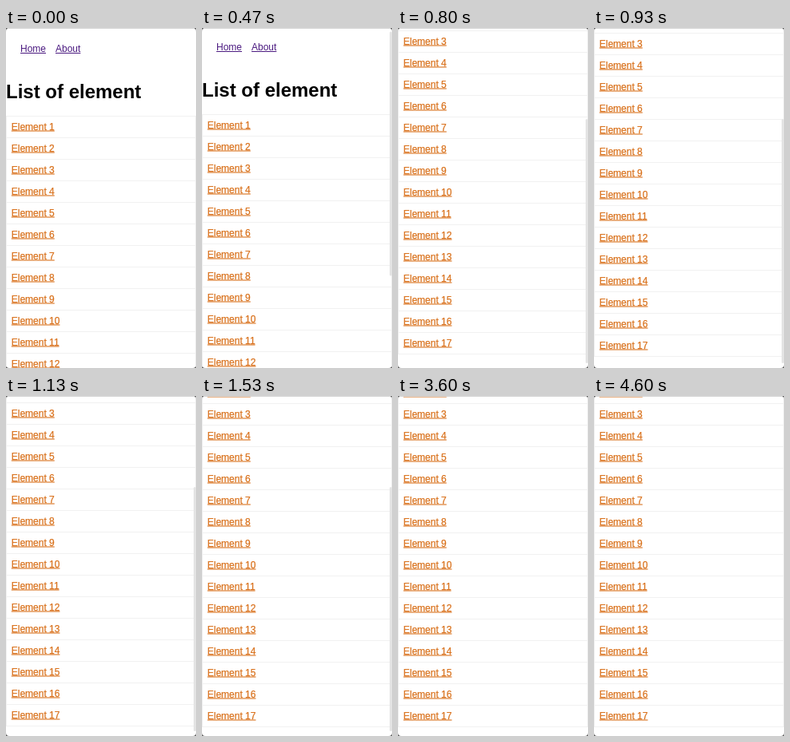
Animation, 238 px wide and 426 px high, one loop 4.67 s. Source, as an HTML page:

```html
<!DOCTYPE html>
<html lang="en">
<head>
<meta charset="utf-8">
<style>
  html, body { margin: 0; width: 100%; height: 100%; overflow: hidden; background: #555; }
  #stage {
    position: relative; width: 238px; height: 426px; overflow: hidden;
    background: #fff; border-radius: 4px;
    font: 12px/14px "Liberation Sans", Arial, sans-serif; color: #000;
  }
  #stage::after {
    content: ""; position: absolute; inset: 0;
    border-radius: 4px; box-shadow: inset 0 1px #d6d6d6;
  }
  #list { position: absolute; top: 0; left: 0; width: 238px; height: 581px; }
  nav { position: absolute; left: 18px; top: 19px; }
  nav span { margin-right: 12px; float: left; color: #4b1a80; text-decoration: underline; }
  h1 { position: absolute; left: 0; top: 66px; margin: 0; font-size: 24px; line-height: 27px; white-space: nowrap; }
  ul {
    position: absolute; top: 110px; left: 0; width: 236px; margin: 0; padding: 0;
    list-style: none; border: 1px solid #f1f1f1; border-top: 0;
  }
  li { height: 26px; line-height: 26px; padding-left: 5.75px; border-top: 1px solid #f1f1f1; }
  li span {
    color: #d9721d; -webkit-text-stroke: 0.25px #d9721d;
    text-decoration: underline 2px #eab182; text-underline-offset: 0; text-decoration-skip-ink: none;
  }
  #detail {
    position: absolute; left: 66px; top: -10.5px; margin: 0;
    font-family: inherit; font-size: 14.4px; line-height: 16.52px;
  }
  #thumb {
    position: absolute; right: 0; top: 3px; width: 3px; height: 306px;
    border-radius: 2px; background: #e4e4e4;
  }
</style>
</head>
<body>
<div id="stage">
  <div id="list">
    <nav><span>Home</span><span>About</span></nav>
    <h1>List of element</h1>
    <ul></ul>
  </div>
  <pre id="detail">dolor sit amet,
consectetur
adipiscing elit.
Sed pharetra,
velit eget tempor
pharetra, dui
urna laoreet
dolor, sed lacinia
nisl ante id
diam. Etiam
faucibus nisl sed
urna vestibulum
dapibus. Nunc
et tortor id eros
convallis
vestibulum.
Nulla sem mi,
convallis sit
amet lobortis
non, fringilla eu
velit. Curabitur
tellus odio,
malesuada in
euismod
semper, efficitur
ut diam.
Vestibulum</pre>
  <div id="thumb"></div>
</div>
<script>
  const LOOP = 4670, TICK = 1000 / 15, MAX_SCROLL = 155;
  const FLICK_START = 7, BOUNCE_START = 12, OPEN = 28, BACK = 54;
  const FLICK = [2, 25, 80, 138, 160];
  const [list, detail, thumb] = ['list', 'detail', 'thumb'].map(id => document.getElementById(id));

  for (let i = 1; i <= 17; i++) {
    const link = document.createElement('span');
    link.textContent = 'Element ' + i;
    list.querySelector('ul').appendChild(document.createElement('li')).appendChild(link);
  }

  // Quick flick past the end, then an exponential rubber-band return.
  function scrollAt(tick) {
    if (tick < FLICK_START) return 0;
    if (tick < BOUNCE_START) return FLICK[tick - FLICK_START];
    const over = 6 * Math.exp(-0.36 * (tick - BOUNCE_START));
    return MAX_SCROLL + Math.round(over);
  }

  function thumbOpacity(tick) {
    if (tick < FLICK_START) return 0;
    return Math.max(0, Math.min(1, (27 - tick) / 4));
  }

  function draw(now) {
    const tick = Math.floor((now % LOOP + 5) / TICK);
    const reading = tick >= OPEN && tick < BACK;
    const scroll = scrollAt(tick);
    list.style.display = reading ? 'none' : 'block';
    detail.style.display = reading ? 'block' : 'none';
    list.style.transform = `translateY(${-scroll}px)`;
    thumb.style.transform = `translateY(${Math.min(scroll / MAX_SCROLL, 1) * 111}px)`;
    thumb.style.opacity = thumbOpacity(tick);
  }

  const start = performance.now();
  function loop() {
    draw(performance.now() - start);
    requestAnimationFrame(loop);
  }
  loop();
</script>
</body>
</html>
```
